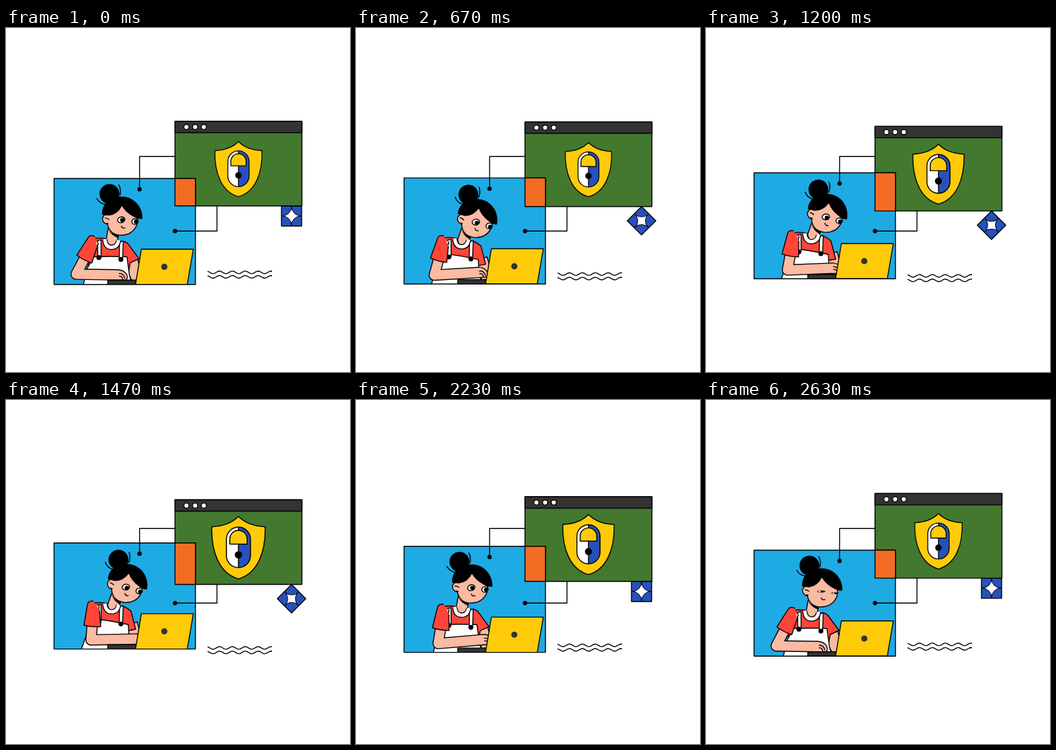
Write an HTML page that moves like this. It is 512x512 px and loops after 2.67 s.

```html
<!DOCTYPE html>
<html lang="en">
<head>
<meta charset="utf-8">
<title>Secure work</title>
<style>
  html, body { margin: 0; width: 100%; height: 100%; overflow: hidden; background: #fff; }
  svg { display: block; width: 100%; height: 100%; }
  .ink { stroke: #000; stroke-width: 1.4; stroke-linejoin: round; }
  .line { fill: none; stroke: #000; stroke-width: 1.4; stroke-linejoin: round; }
  .skin { fill: #fbbaa2; }
  .red { fill: #ff4538; }
  .white { fill: #fff; }
  .blue { fill: #2750bb; }
  .yellow { fill: #ffcb08; }
  .dark { fill: #333; }
</style>
</head>
<body>
<svg viewBox="0 0 512 512">
  <defs>
    <clipPath id="frame"><rect x="71.5" y="223.5" width="210.5" height="157.8"/></clipPath>
  </defs>

  <g id="waves"><path id="wave1" class="line"/><path id="wave2" class="line"/></g>

  <g id="tile">
    <rect class="blue ink" x="-15" y="-15" width="30" height="30"/>
    <path class="white ink" style="stroke-width:1" d="M0-14A14 14 0 0 0 14 0A14 14 0 0 0 0 14A14 14 0 0 0-14 0A14 14 0 0 0 0-14Z"/>
  </g>

  <g id="win">
    <rect class="ink" fill="#43782f" x="251.5" y="0" width="189" height="126"/>
    <rect class="dark ink" x="251.5" y="0" width="189" height="17"/>
    <g class="white ink">
      <circle cx="268.5" cy="8.6" r="3.8"/><circle cx="281.5" cy="8.6" r="3.8"/><circle cx="294.4" cy="8.6" r="3.8"/>
    </g>
    <g id="shield">
      <path class="yellow ink" d="M0-43.3Q-13-30-37-29C-38 5-27 36 0 43.3C27 36 38 5 37-29Q13-30 0-43.3Z"/>
      <rect class="white" x="-16.7" y="-28.5" width="33.4" height="56.2" rx="16.7"/>
      <path class="blue" d="M0-28.5A16.7 16.7 0 0 1 16.7-11.8V11A16.7 16.7 0 0 1 0 27.7Z"/>
      <path class="line" d="M0-28.5V27.7"/>
      <rect class="line" x="-16.7" y="-28.5" width="33.4" height="56.2" rx="16.7"/>
      <path class="yellow ink" d="M-12-5V-12A12 12 0 0 1 12-12V-5Z"/>
      <circle cx="0" cy="10" r="5.1"/>
    </g>
  </g>

  <g id="panel">
    <rect fill="#1eaae3" x="71.5" y="223.5" width="210.5" height="157.8"/>
    <g clip-path="url(#frame)">
      <path class="skin ink" d="M184 345L195 341Q200 355 200 372L188 377L181 362Z"/>
      <path id="shirt" class="red ink"/>
      <path id="apron" class="white ink"/>
      <path class="white ink" d="M136.5 316L141.5 315V341H136.5ZM169 318L174.5 317L173.5 344H168.5Z"/>
      <circle cx="138.2" cy="341.2" r="3.6"/><circle cx="171" cy="344" r="3.6"/>
      <path id="neck" class="skin ink" d="M152 298L149 315Q151 323 157 323Q164 322 166 316L167 304Z"/>
      <path fill="none" stroke="#000" stroke-width="7.6" d="M147 314Q148 326 157 326Q166 326 167.5 316"/>
      <path fill="none" stroke="#fff" stroke-width="5" d="M147 313.5Q148 326 157 326Q166 326 167.5 315.5"/>

      <g id="head">
        <path d="M151 298Q158 309 168 306L167.5 312Q157 309 151 298Z"/>
        <path class="skin ink" d="M153 278C145 274 141 284 146 289Q149 292 151 291Q154 308 172 308Q189 307 195 292L196 278L182 262H164Z"/>
        <path class="line" d="M147 282.5Q150 282 153.5 285M149 290L152.5 290.5"/>
        <g id="eyeL">
          <ellipse class="white ink" rx="5.5" ry="4.3" transform="rotate(-20)"/>
          <circle class="pupil" r="3.2"/>
        </g>
        <g id="eyeR">
          <ellipse class="white ink" rx="4.8" ry="4.2" transform="rotate(-20)"/>
          <circle class="pupil" r="3.2"/>
        </g>
        <path class="line" d="M171.5 294Q172.5 298.5 177.5 297"/>
        <path d="M143 277.5C142 262 154 250 172 250.5C190 250 204 266 203 283.5Q196 284.5 190 280.5Q178 274 172.5 264.5Q166 277 154 278.5Q148 278.5 143 277.5Z"/>
        <circle cx="154" cy="246.5" r="14.8"/>
        <path class="line" d="M167.5 232.5Q172 240 169.5 249M135 253Q139 261 148 262"/>
      </g>

      <path class="arm line" style="stroke-width:16.8"/>
      <path class="arm line" style="stroke-width:14;stroke:#fbbaa2"/>
      <g id="hand">
        <path class="skin ink" d="M-1-7.7Q9-8 13.5-1Q16.5 6 12 7.2Q5 8-1 7.7"/>
        <path class="line" d="M2-2Q9-3 11 5.5M2 2Q7 1 8 7"/>
      </g>
      <path id="sleeve" class="red ink" d="M-1-6Q-9-7-10 0L-15 30Q-3 33 10 32L8 8"/>

      <rect class="dark ink" x="151.5" y="374.8" width="45" height="7"/>
      <path class="yellow ink" d="M201.5 328.8H278.8L269.8 381.3H192.8Z"/>
      <circle class="dark" cx="235.6" cy="355" r="4.6"/>
    </g>
    <rect class="line" x="71.5" y="223.5" width="210.5" height="157.8"/>
  </g>

  <rect id="overlap" class="ink" fill="#f36c24" x="251.5" width="30.5"/>
  <path id="link1" class="line"/><circle id="dot1" cx="198.8" r="3.2"/>
  <path id="link2" class="line"/><circle cx="251.6" cy="302.3" r="3.2"/>
</svg>

<script>
const LOOP = 2670, TAU = Math.PI * 2, RAD = Math.PI / 180;
const WIN_H = 126, PANEL_Y = 223.5;
const $ = id => document.getElementById(id);
const set = (el, attrs) => { for (const k in attrs) el.setAttribute(k, attrs[k]); };
const move = (id, tf) => $(id).setAttribute('transform', tf);
const mix = (a, b, k) => a + (b - a) * k;
const wave = (t, peak) => Math.cos(TAU * (t - peak) / LOOP);

function ease(t, from, to) {
  const u = Math.min(1, Math.max(0, (t - from) / (to - from)));
  return u * u * (3 - 2 * u);
}

// Rises in one span and falls back in a later one
const hold = (t, a, b, c, d) => ease(t, a, b) - ease(t, c, d);
const bump = u => Math.max(0, 1 - u * u);

function track(keys, t) {
  let v = keys[0][1];
  for (let i = 1; i < keys.length; i++) {
    v += (keys[i][1] - keys[i - 1][1]) * ease(t, keys[i - 1][0], keys[i][0]);
  }
  return v;
}

const ARM_ANGLE = [[0, 28], [370, 16], [970, 15], [1470, 5], [1830, 5], [2230, 9.5], [2630, 28]];
const HAND_Y = [[0, 367], [370, 363.5], [970, 365], [1470, 366.5], [1830, 366.5], [2230, 362.5], [2630, 367]];

function ripple(y) {
  let d = '';
  for (let x = 300; x <= 396; x += 1.5) {
    d += (d ? 'L' : 'M') + x + ' ' + (y - 1.9 * Math.cos((x - 298.5) / 19.2 * TAU)).toFixed(2);
  }
  return d;
}

function drawBody(t) {
  const lean = hold(t, 60, 400, 1520, 1880);
  const tilt = `rotate(${9.3 * lean} 149 329.5)`;
  move('head', tilt);
  move('neck', tilt);

  const p = (x1, y1, x2, y2) => mix(x1, x2, lean) + ' ' + mix(y1, y2, lean);
  set($('shirt'), { d: `M124 314Q135 311 147 313L168 317Q176 316 ${p(181, 320, 186, 325)}L${p(198, 343, 193, 352)}L${p(185, 349, 182, 354)}L182 364H122Z` });
  set($('apron'), { d: `M${p(131, 340, 136, 337)}Q155 339 ${p(180, 340, 182, 345)}L183 362Q184 374 190 382H${mix(115, 112, lean)}L121 357Z` });

  const open = 1 - Math.max(bump((t - 370) / 110), bump((t - 2600) / 70));
  const lid = 0.16 + 0.84 * open;
  move('eyeL', `translate(171.5 285) scale(1 ${lid})`);
  move('eyeR', `translate(192 287.5) scale(1 ${lid})`);
  document.querySelectorAll('.pupil').forEach(e => set(e, { cx: 1.6, cy: mix(0.3, 1, lean) }));
}

function drawArm(t) {
  const a = track(ARM_ANGLE, t), len = 52 + (a - 5) * 0.2;
  const ex = 131 - len * Math.sin(a * RAD), ey = 316 + len * Math.cos(a * RAD);
  const hx = 166 + 1.27 * (ex - 104.4), hy = track(HAND_Y, t);
  document.querySelectorAll('.arm').forEach(e => set(e, { d: `M131 316L${ex} ${ey}L${hx} ${hy}` }));
  move('hand', `translate(${hx} ${hy}) rotate(${Math.atan2(hy - ey, hx - ex) / RAD})`);
  move('sleeve', `translate(131 316) rotate(${a - 5})`);
}

function draw(t) {
  const top = 143.2 - 5.7 * wave(t, 285), base = top + WIN_H;
  const py = 218.9 + 6.6 * wave(t, 300);
  move('win', `translate(0 ${top})`);
  move('panel', `translate(0 ${py - PANEL_Y})`);
  move('shield', `translate(346 71.2) scale(${1 - 0.087 * wave(t, 390)})`);
  set($('overlap'), { y: py, height: base - py });

  const turn = 45 * hold(t, 340, 530, 1480, 1690);
  const reach = 15 * (Math.cos(turn * RAD) + Math.sin(turn * RAD));
  move('tile', `translate(425 ${base + reach}) rotate(${turn})`);

  set($('link1'), { d: `M251.5 191.2H198.8V${py + 16}` });
  set($('dot1'), { cy: py + 16 });
  set($('link2'), { d: `M251.6 302.3H314V${base}` });
  move('waves', `translate(0 ${-2.7 * wave(t, 30)})`);

  drawBody(t);
  drawArm(t);
}

set($('wave1'), { d: ripple(366.4) });
set($('wave2'), { d: ripple(373.1) });

function tick() {
  draw(performance.now() % LOOP);
  requestAnimationFrame(tick);
}
tick();
</script>
</body>
</html>
```
